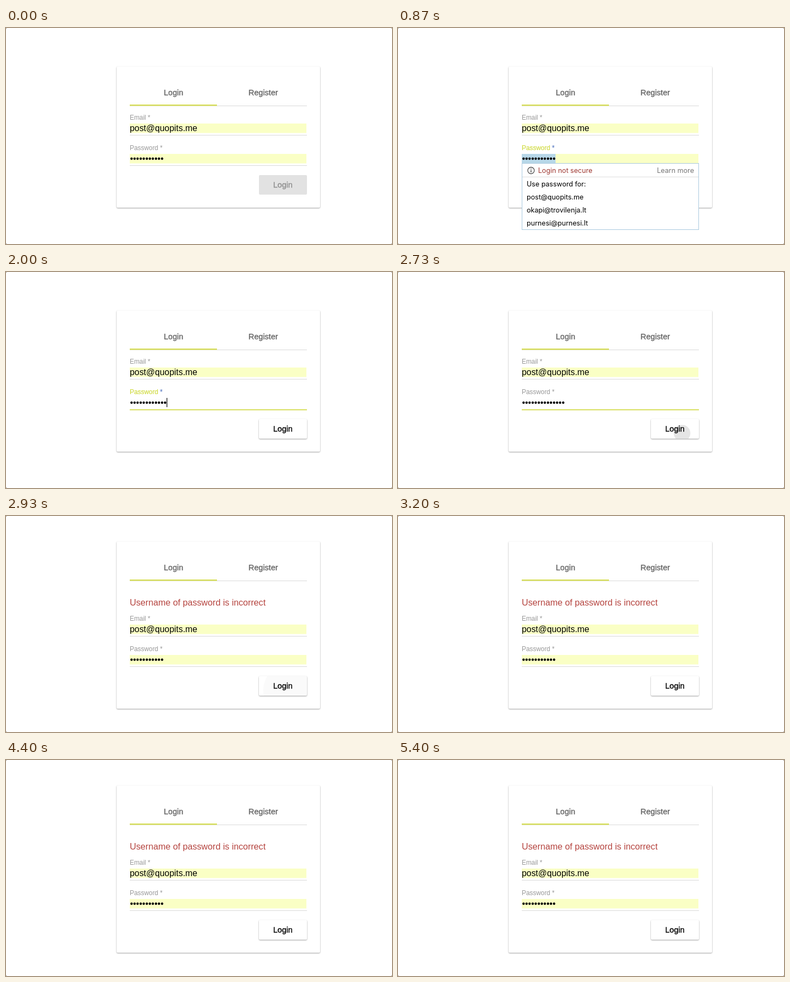
Recreate the animation shown at these times as an HTML page. Size 708x398 px, loop 5470 ms.

```html
<!DOCTYPE html>
<html lang="en">
<head>
<meta charset="utf-8">
<title>Login form</title>
<style>
  html, body { margin: 0; width: 100%; height: 100%; overflow: hidden; background: #666; }
  svg { display: block; width: 708px; height: 398px; background: #fff; border-radius: 2px; }
  text { font-family: "Liberation Sans", Arial, sans-serif; font-size: 16px; white-space: pre; }
  .raised { fill: #fff; filter: drop-shadow(0 1px 1.3px rgba(0, 0, 0, .38)); }
  .medium { font-size: 14.5px; fill: #666; stroke: #666; stroke-width: .35px; text-anchor: middle; }
  .label { font-size: 11.9px; fill: #989898; }
  .rule { fill: #d9d9d9; }
  .lime { fill: #d8df5c; }
  .fill { fill: #faffc5; }
  .focused .label { fill: #d0db42; stroke: #d0db42; stroke-width: .2px; }
  .focused .star { fill: #5f7fc4; stroke: #5f7fc4; }
  #button .medium { fill: #000; stroke: #000; }
  #button.off .raised { fill: #e2e2e2; filter: none; }
  #button.off .medium { fill: #8e8e8e; stroke: #8e8e8e; }
  #menu text { font: 12.6px Inter, "Open Sans", sans-serif; }
</style>
</head>
<body>
<svg viewBox="0 0 708 398">
  <defs>
    <clipPath id="buttonClip"><rect x="464" y="271" width="88" height="36" rx="2"/></clipPath>
  </defs>

  <rect id="card" class="raised" x="203" y="71" width="373" height="260" rx="2"/>

  <g id="tabs">
    <rect class="rule" x="227" y="143" width="325" height="1"/>
    <rect class="lime" x="227" y="141" width="160" height="2.5"/>
    <text class="medium" x="307.3" y="124">Login</text>
    <text class="medium" x="471.8" y="124">Register</text>
  </g>

  <text id="error" x="227" y="165" style="font-size:16.2px" fill="#b5443f">Username of password is incorrect</text>

  <g id="form">
    <text class="label" x="227" y="169">Email *</text>
    <rect class="fill" x="227" y="176" width="324" height="17.5"/>
    <text x="227" y="190" style="font-size:15.9px">post@quopits.me</text>
    <rect class="rule" x="227" y="197" width="325" height="1"/>

    <g id="password">
      <text class="label" x="227" y="225">Password <tspan class="star">*</tspan></text>
      <rect id="autofill" class="fill" x="227" y="232" width="324" height="17.5"/>
      <rect id="selection" x="227" y="232" width="62" height="17.5" fill="#b7d7e8"/>
      <text id="dots" x="227.4" y="246"></text>
      <rect id="caret" y="232" width="1.2" height="17"/>
      <rect class="rule" x="227" y="253" width="325" height="1"/>
      <rect id="focusLine" class="lime" x="227" y="252.8" width="325" height="2"/>
    </g>

    <g id="button">
      <rect class="raised" x="464" y="271" width="88" height="36" rx="2"/>
      <g clip-path="url(#buttonClip)"><circle id="ripple" cx="521" cy="297" fill="#000"/></g>
      <text class="medium" x="507.8" y="294">Login</text>
    </g>
  </g>

  <g id="menu">
    <rect x="227.5" y="249.5" width="324" height="122" fill="#fff" stroke="#a9c9df"/>
    <rect x="228" y="274" width="323" height="1" fill="#dedede"/>
    <circle cx="244" cy="262.5" r="6" fill="none" stroke="#505050" stroke-width="1.3"/>
    <path d="M244 259v1.6M244 261.7v4.3" stroke="#505050" stroke-width="1.5"/>
    <text x="257" y="267.3" fill="#9e3730">Login not secure</text>
    <text x="543" y="267.3" fill="#757575" text-anchor="end">Learn more</text>
    <text x="236" y="292.3">Use password for:</text>
    <text x="236" y="316.3">post@quopits.me</text>
    <text x="236" y="340.3">okapi@trovilenja.lt</text>
    <text x="236" y="364.3">purnesi@purnesi.lt</text>
  </g>
</svg>

<script>
const LOOP = 5470;
const DOT = 5.6;
const SHIFT = 24;

// Each step changes only the properties it lists.
const steps = [
  [0, { dots: 11, autofill: 1, menu: 0, selection: 0, caret: 0, focused: 0, line: 0, enabled: 0, error: 0 }],
  [870, { menu: 1, selection: 1, focused: 1, line: 1 }],
  [930, { enabled: 1 }],
  [1470, { selection: 0, caret: 1 }],
  [1870, { menu: 0, autofill: 0, dots: 12 }],
  [2070, { dots: 13 }],
  [2270, { dots: 14 }],
  [2670, { focused: 0, caret: 0 }],
  [2800, { line: 0 }],
  [2930, { error: 1, autofill: 1, dots: 11 }]
];

const $ = id => document.getElementById(id);
const show = (id, on) => { $(id).style.display = on ? "" : "none"; };
const move = (id, y) => $(id).setAttribute("transform", `translate(0 ${y})`);

function stateAt(t) {
  return Object.assign({}, ...steps.filter(([at]) => at <= t).map(([, change]) => change));
}

function drawRipple(t) {
  const age = Math.floor((t + 4) * 0.015) / 0.015 - 2667;
  const alive = age >= 0 && age < 300;
  $("ripple").setAttribute("r", alive ? 4 + age * 0.17 : 0);
  $("ripple").setAttribute("opacity", alive ? 0.1 * Math.min(1, (300 - age) / 180) : 0);
}

function draw(t) {
  const s = stateAt(t);
  const shift = s.error ? SHIFT : 0;
  $("card").setAttribute("y", 71 - shift);
  $("card").setAttribute("height", 260 + 2 * shift);
  move("tabs", -shift);
  move("form", shift);

  show("error", s.error);
  show("menu", s.menu);
  show("autofill", s.autofill);
  show("selection", s.selection);
  show("caret", s.caret);
  show("focusLine", s.line);

  $("dots").textContent = "•".repeat(s.dots);
  $("caret").setAttribute("x", 227.4 + s.dots * DOT);
  $("password").classList.toggle("focused", !!s.focused);
  $("button").classList.toggle("off", !s.enabled);
  drawRipple(t);
}

const start = performance.now();
function tick() {
  draw((performance.now() - start) % LOOP);
  requestAnimationFrame(tick);
}
tick();
</script>
</body>
</html>
```
